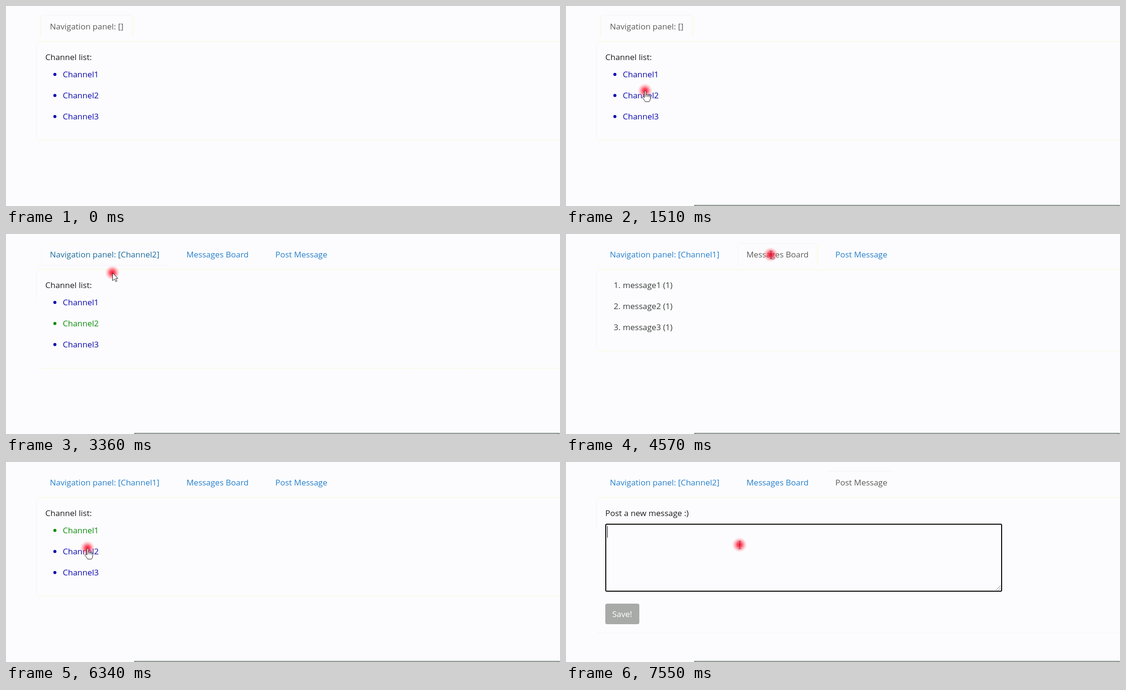
Animation of 1156 by 418 pixels, one loop 8000 ms. Source, as an HTML page with a canvas:

```html
<!DOCTYPE html>
<html lang="en">
<head>
<meta charset="utf-8">
<title>Channel message board</title>
<style>
html, body { margin: 0; width: 100%; height: 100%; overflow: hidden; background: #fcfcfe; }
canvas { display: block; }
</style>
</head>
<body>
<canvas id="stage" width="1156" height="418"></canvas>
<script>
const ctx = document.getElementById('stage').getContext('2d');
const LOOP = 8000;
const YELLOW = '#f8f7d2', GREY = '#e2e2f0', INK = '#1c1e1c', SOFT_INK = '#3c403c',
      LINK = '#2680cc', ACTIVE = '#5a5c58', BLUE = '#0a0aae', GREEN = '#0c8c0c';
const DOTS = [1, 2], DASHES = [3, 1];

// start time, view, selected channel
const scenes = [
  [0, 'list', ''],
  [1850, 'empty', 'Channel2'],
  [3100, 'list', 'Channel2'],
  [4030, 'messages', 'Channel1'],
  [5920, 'list', 'Channel1'],
  [6640, 'empty', 'Channel2'],
  [7150, 'post', 'Channel2']
];

// time, x, y, 1 when the pointer passes through without stopping
const path = [
  [290, 300, -20], [840, 138, 134], [1010, 138, 134], [1510, 165, 177],
  [2220, 165, 177], [2350, 152, 95, 1], [3020, 215, 45], [3100, 215, 45],
  [3360, 222, 81, 1], [3820, 150, 140], [4030, 150, 140], [4570, 427, 43],
  [5030, 427, 43], [5540, 215, 45], [5920, 215, 45], [6340, 170, 180, 1],
  [6600, 165, 183], [6760, 165, 183], [7110, 610, 45], [7190, 610, 45],
  [7550, 362, 173]
];

const shapes = {
  hand: new Path2D('M-1.5 1.5Q0-1.5 1.5 1.5V8Q3 6.5 4.5 8.5Q6 7.5 7.5 9.5Q10 8.5 10.5 11V16Q10 20 8 22.5H0Q-2 19-6 14Q-5 10.5-1.5 14Z'),
  arrow: new Path2D('M0 0V16L4 12.5L6.5 18L9 17L6.5 11.5H11Z'),
  beam: new Path2D('M-3-8H3M0-8V8M-3 8H3')
};

function text(str, x, y, color = INK, weight = 400) {
  ctx.font = `${weight} 17px "Open Sans", "Noto Sans", sans-serif`;
  ctx.fillStyle = color;
  ctx.fillText(str, x, y);
}

function line(x1, y1, x2, y2, color, dash = []) {
  ctx.setLineDash(dash);
  ctx.strokeStyle = color;
  ctx.lineWidth = 1;
  ctx.beginPath();
  ctx.moveTo(x1, y1);
  ctx.lineTo(x2, y2);
  ctx.stroke();
  ctx.setLineDash([]);
}

function pointerAt(t) {
  if (t < path[0][0]) return null;
  const next = path.findIndex(key => key[0] > t);
  if (next < 0) return path.at(-1).slice(1, 3);
  const a = path[next - 1], b = path[next];
  const p = (t - a[0]) / (b[0] - a[0]);
  const e = a[3] ? 1 - (1 - p) ** 2 : b[3] ? p * p : p * p * (3 - 2 * p);
  return [a[1] + (b[1] - a[1]) * e, a[2] + (b[2] - a[2]) * e];
}

function tabsFor(view, channel) {
  const tabs = [{ label: `Navigation panel: [${channel}]`, left: 72.5, right: channel ? 338.5 : 264.5, active: !channel }];
  if (channel) tabs.push(
    { label: 'Messages Board', left: 358.5, right: 524.5, active: view === 'empty' || view === 'messages' },
    { label: 'Post Message', left: 544.5, right: 688.5, active: view === 'post' });
  return tabs;
}

function drawTab(tab, index, pointer) {
  const { left, right, active } = tab;
  const hover = !active && pointer && pointer[0] > left && pointer[0] < right && pointer[1] > 14 && pointer[1] < 90;
  text(tab.label, [91.5, 376.5, 562][index], 49, active ? ACTIVE : hover ? '#1c6c9c' : LINK);
  if (active) {
    line(left + 3, 19.5, right - 3, 19.5, GREY, DOTS);
    if (index < 2) {
      line(left, 21, left, 65, index ? GREY : YELLOW, index ? DOTS : []);
      line(right, 22, right, 64, YELLOW);
    }
  } else if (hover) {
    line(left + 2, 19.5, right, 19.5, YELLOW, DOTS);
    line(left, 22, left, 65, YELLOW, DOTS);
    line(left, 65.5, right, 65.5, GREY, DOTS);
  }
}

function drawPanel(view, channel) {
  const bottom = { list: 280.5, empty: 141.5, messages: 244.5, post: 357.5 }[view];
  const pale = view === 'empty' || view === 'post';
  const leftEnd = view === 'post' || channel === 'Channel2' ? 142 : bottom - 3;
  line(66, 74.5, 1156, 74.5, YELLOW);
  line(63.5, 77, 63.5, leftEnd, GREY, DOTS);
  line(66, bottom, 1156, bottom, pale ? GREY : YELLOW, pale ? DOTS : DASHES);
}

const views = {
  list(channel) {
    text('Channel list:', 82, 113);
    for (let i = 0; i < 3; i++) {
      const name = 'Channel' + (i + 1), y = 149 + i * 44;
      const color = name === channel ? GREEN : BLUE;
      text(name, 118.5, y, color);
      ctx.beginPath();
      ctx.arc(102, y - 6, 3.2, 0, 7);
      ctx.fill();
    }
  },
  empty() {
    text('You Can add new message with "Post Message"', 82, 110, INK, 600);
  },
  messages() {
    for (let i = 1; i < 4; i++) {
      const y = 69 + i * 44;
      text(i + '.', 99.5, y, SOFT_INK);
      text(`message${i} (1)`, 118.5, y, SOFT_INK);
    }
  },
  post() {
    text('Post a new message :)', 82, 113);
    ctx.strokeStyle = '#000';
    ctx.lineWidth = 2;
    ctx.beginPath();
    ctx.roundRect(83, 130, 826, 140, 2);
    ctx.stroke();
    line(86.5, 134, 86.5, 158, '#000');
    line(897, 268, 907, 258, '#777');
    line(902, 268, 907, 263, '#777');
    ctx.fillStyle = '#a8aaa8';
    ctx.beginPath();
    ctx.roundRect(82, 296, 71, 43, 4);
    ctx.fill();
    text('Save!', 96.5, 324, '#fff', 500);
  }
};

function pointerShape(view, tabs, [x, y]) {
  const inside = (l, t, r, b) => x >= l && x <= r && y >= t && y <= b;
  const tab = tabs.find(tab => inside(tab.left, 20, tab.right, 66));
  if (tab) return tab.active ? 'beam' : 'hand';
  const rows = first => [0, 44, 88].some(d => inside(118, first + d, 223, first + d + 27));
  if (view === 'list') return rows(129) && x < 194 ? 'hand' : inside(82, 93, 178, 120) ? 'beam' : 'arrow';
  const onText = view === 'messages' ? rows(93)
    : view === 'empty' ? inside(82, 90, 470, 117) : inside(82, 129, 910, 271);
  return onText ? 'beam' : 'arrow';
}

function drawPointer(shape, [x, y]) {
  ctx.save();
  ctx.translate(Math.round(x), Math.round(y));
  const glow = ctx.createRadialGradient(0, 0, 0, 0, 0, 15);
  glow.addColorStop(0, 'rgba(252,8,40,.95)');
  glow.addColorStop(.35, 'rgba(252,30,60,.75)');
  glow.addColorStop(1, 'rgba(255,150,150,.06)');
  ctx.fillStyle = glow;
  ctx.beginPath();
  ctx.arc(0, 0, 15, 0, 7);
  ctx.fill();
  ctx.translate(.5, .5);
  ctx.lineWidth = 1;
  if (shape === 'beam') {
    ctx.strokeStyle = 'rgba(70,20,40,.55)';
  } else {
    ctx.strokeStyle = '#221c1c';
    ctx.fillStyle = '#fff';
    ctx.fill(shapes[shape]);
  }
  ctx.stroke(shapes[shape]);
  if (shape === 'hand') {
    for (const i of [0, 1, 2]) line(1.5 + 3 * i, 8 + i, 1.5 + 3 * i, 12 + i / 2, '#221c1c');
  }
  ctx.restore();
}

function draw(t) {
  const [, view, channel] = scenes.findLast(scene => scene[0] <= t);
  const pointer = pointerAt(t);
  const tabs = tabsFor(view, channel);
  ctx.fillStyle = '#fcfcfe';
  ctx.fillRect(0, 0, 1156, 418);
  tabs.forEach((tab, i) => drawTab(tab, i, pointer));
  drawPanel(view, channel);
  views[view](channel);
  if (t >= 40) {
    ctx.strokeStyle = '#1c301c';
    ctx.lineWidth = 1;
    ctx.strokeRect(268.5, 416.5, 886, 10);
  }
  if (pointer) drawPointer(pointerShape(view, tabs, pointer), pointer);
}

const start = performance.now();
function tick() {
  draw((performance.now() - start) % LOOP);
  requestAnimationFrame(tick);
}
tick();
</script>
</body>
</html>
```
